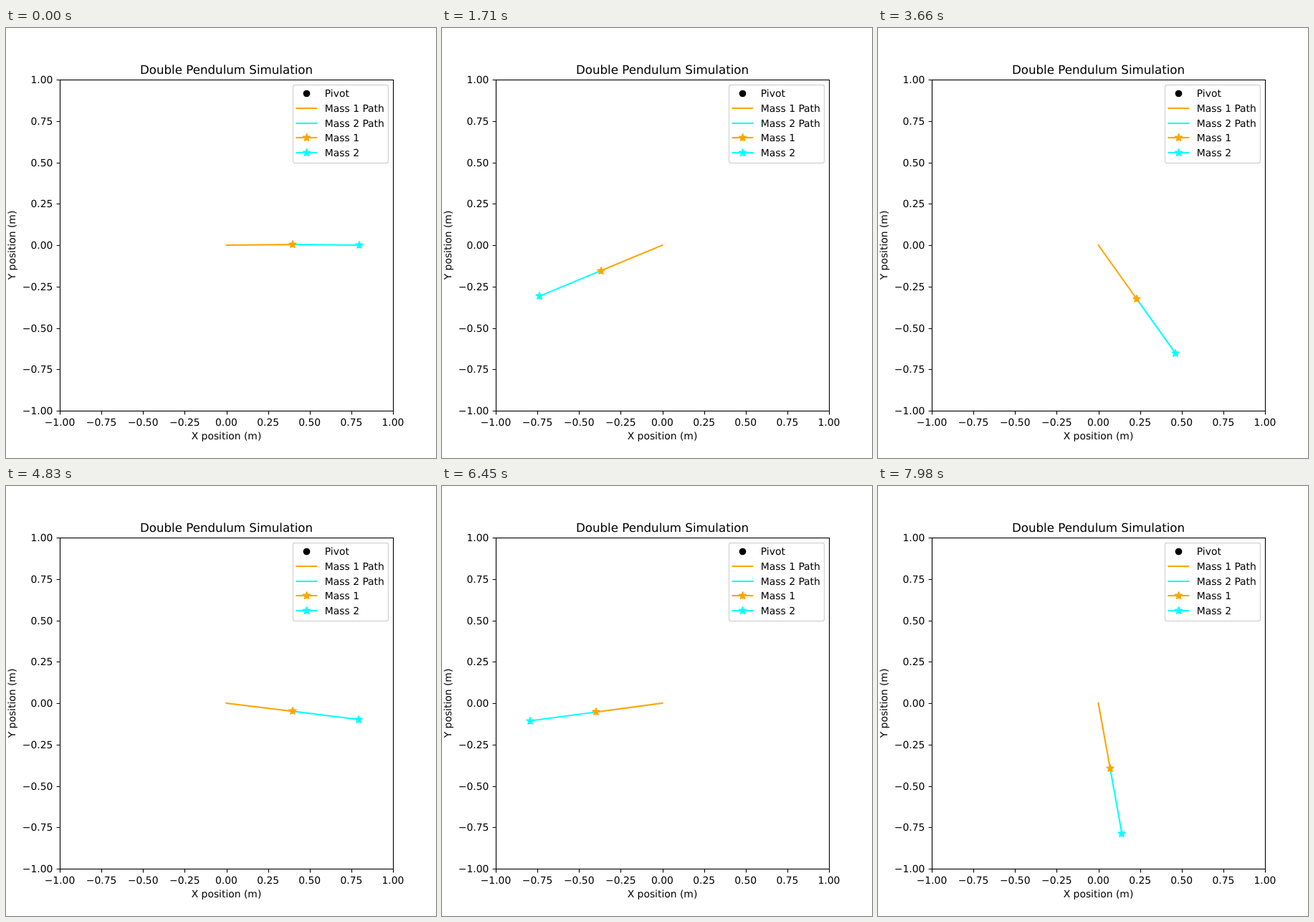
These frames come from a looping animation (600 px wide and 600 px high, 8 s). An HTML page:

```html
<!DOCTYPE html>
<html lang="en">
<head>
<meta charset="utf-8">
<title>Double Pendulum Simulation</title>
<style>
  html, body { margin: 0; width: 100%; height: 100%; overflow: hidden; background: #fff; }
  svg { display: block; width: 600px; height: 600px; }
  text { font: 13.89px "DejaVu Sans", sans-serif; text-rendering: geometricPrecision; }
  .title { font-size: 16.67px; }
  .middle { text-anchor: middle; }
  .end { text-anchor: end; }
  .axis { fill: none; stroke: #000; stroke-width: 1.11; }
  .link { stroke-width: 2.08; stroke-linecap: square; }
  .marker { stroke-width: 1.39; stroke-linejoin: bevel; }
</style>
</head>
<body>
<svg id="stage" viewBox="0 0 600 600"></svg>
<script>
const ORANGE = '#ffa500', CYAN = '#00ffff';
const LEFT = 75, RIGHT = 540, TOP = 72, BOTTOM = 534;
const PIVOT = { x: 307.5, y: 303 };
const LINK = 0.4, SCALE_X = 232.5, SCALE_Y = 231;
const STEP = 30, LOOP = 8000;
const FREQUENCY = 1.6455, AMPLITUDE = 1.58;

const stage = document.getElementById('stage');

function add(tag, attributes, content = '') {
  const node = document.createElementNS('http://www.w3.org/2000/svg', tag);
  set(node, attributes);
  node.textContent = content;
  return stage.appendChild(node);
}

function set(node, attributes) {
  for (const [name, value] of Object.entries(attributes)) node.setAttribute(name, value);
}

const text = (x, y, content, cls = '') => add('text', { x, y, class: cls }, content);
const link = color => add('line', { class: 'link', stroke: color });
const setLink = (node, a, b) => set(node, { x1: a.x, y1: a.y, x2: b.x, y2: b.y });
const setStar = (node, x, y) => set(node, { transform: `translate(${x} ${y})` });

function star(color) {
  const points = Array.from({ length: 10 }, (_, i) => {
    const radius = i % 2 ? 5.55 * 0.382 : 5.55, angle = i * Math.PI / 5;
    return [radius * Math.sin(angle), -radius * Math.cos(angle)].map(v => v.toFixed(3));
  });
  return add('polygon', { class: 'marker', points: points.join(' '), fill: color, stroke: color });
}

function drawAxes() {
  for (let i = 0; i <= 8; i++) {
    const label = (i / 4 - 1).toFixed(2).replace('-', '\u2212');
    const x = LEFT + (RIGHT - LEFT) * i / 8, y = BOTTOM - (BOTTOM - TOP) * i / 8;
    const tickX = Math.round(x) + 0.5, tickY = Math.round(y) + 0.5;
    add('path', { class: 'axis', d: `M${tickX} 534.5v4.9M75.5 ${tickY}h-4.9` });
    text(x, 555, label, 'middle');
    text(65.3, Math.round(y) + 5, label, 'end');
  }
  text(307.5, 64, 'Double Pendulum Simulation', 'title middle');
  text(307.5, 574, 'X position (m)', 'middle');
  set(text(0, 0, 'Y position (m)', 'middle'), { transform: 'translate(13 303) rotate(-90)' });
}

function drawLegend() {
  add('rect', { x: 400.5, y: 79.5, width: 133, height: 109, rx: 2.8,
    fill: '#fff', stroke: '#d6d6d6', 'stroke-width': 1.39 });
  const rows = [['Pivot'], ['Mass 1 Path', ORANGE], ['Mass 2 Path', CYAN],
    ['Mass 1', ORANGE, true], ['Mass 2', CYAN, true]];
  rows.forEach(([label, color, starred], i) => {
    const y = Math.round(91.2 + 20.7 * i);
    if (color) setLink(link(color), { x: 405.5, y }, { x: 433.2, y });
    else add('circle', { cx: 419.5, cy: y + 0.5, r: 4.86 });
    if (starred) setStar(star(color), 419.5, y);
    text(444.8, y + 5, label);
  });
}

// Swing angle from straight down, sampled once per displayed step.
function simulate() {
  const angles = [], substeps = 20, dt = STEP / 1000 / substeps;
  const acceleration = angle => -(FREQUENCY ** 2) * Math.sin(angle);
  let angle = AMPLITUDE, speed = 0;
  for (let t = 0; t < LOOP; t += STEP) {
    angles.push(angle);
    for (let i = 0; i < substeps; i++) {
      speed += acceleration(angle) * dt / 2;
      angle += speed * dt;
      speed += acceleration(angle) * dt / 2;
    }
  }
  return angles;
}

const swing = (from, angle) => ({
  x: from.x + LINK * SCALE_X * Math.sin(angle),
  y: from.y + LINK * SCALE_Y * Math.cos(angle)
});

drawAxes();
const link2 = link(CYAN), star2 = star(CYAN);
const link1 = link(ORANGE), star1 = star(ORANGE);
add('rect', { class: 'axis', x: 75.5, y: 72.5, width: 465, height: 462 });
drawLegend();

const angles = simulate();

function draw(now) {
  const index = Math.floor(now % LOOP / STEP);
  // The links start slightly bent and straighten as tension builds.
  const bend = 0.018 * Math.exp(-index * STEP / 150);
  const mass1 = swing(PIVOT, angles[index]);
  const mass2 = swing(mass1, angles[index] - bend);
  setLink(link1, PIVOT, mass1);
  setLink(link2, mass1, mass2);
  setStar(star1, Math.round(mass1.x), Math.round(mass1.y));
  setStar(star2, Math.round(mass2.x), Math.round(mass2.y));
}

const start = performance.now();
function tick() {
  draw(performance.now() - start);
  requestAnimationFrame(tick);
}
tick();
</script>
</body>
</html>
```
